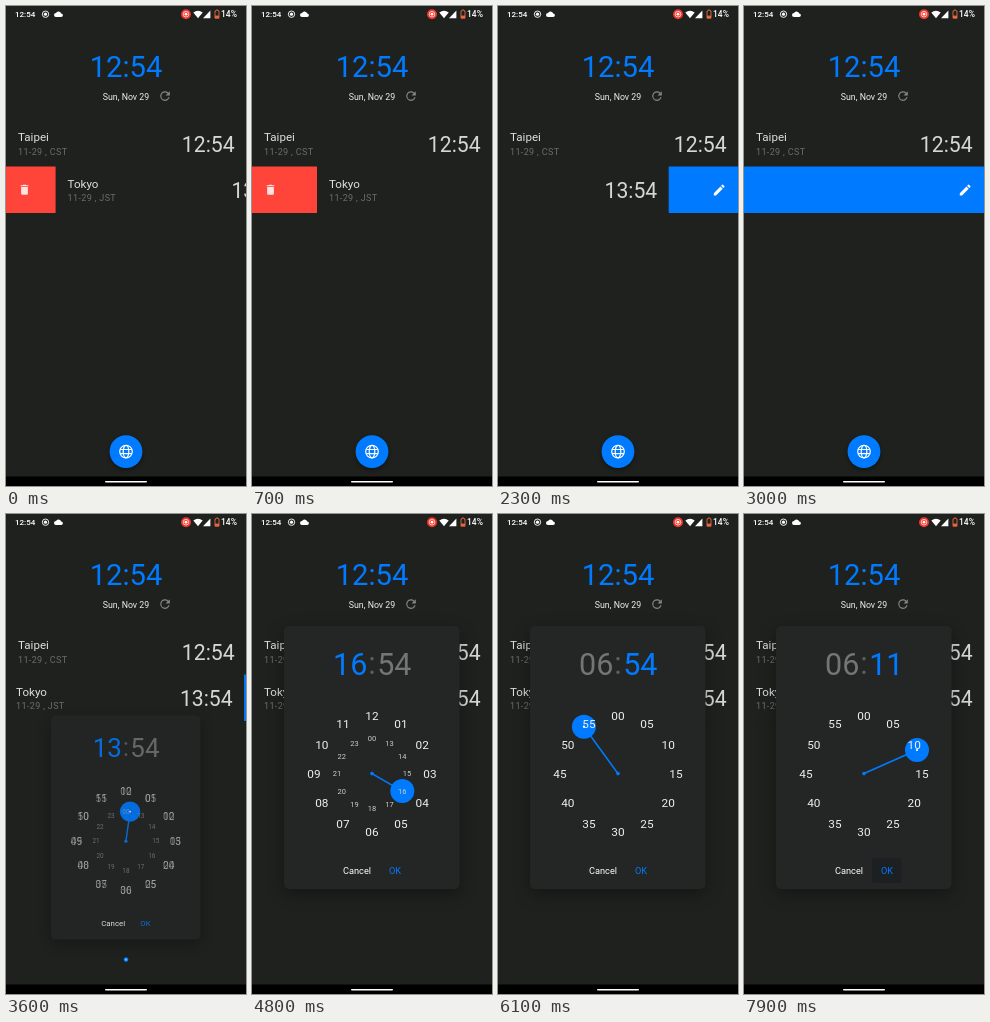
An HTML page for the animation above (8 s loop, 240x480 px).

```html
<!DOCTYPE html>
<html lang="en">
<head>
<meta charset="utf-8">
<title>World clock</title>
<style>
  html, body { margin: 0; height: 100%; overflow: hidden; background: #1f211f; }
  svg { display: block; width: 100vw; height: 100vh; font-family: Roboto, sans-serif; }
  .mid { text-anchor: middle; }
  .end { text-anchor: end; }
  .city { font-size: 11.6px; fill: #dedede; }
  .zone { font-size: 9px; letter-spacing: .35px; fill: #6c6d6c; }
  .time { font-size: 21.2px; fill: #d6d6d6; text-anchor: end; }
  .title { font-size: 30.5px; }
  .button { font-size: 9.2px; text-anchor: middle; }
  .outer { font-size: 11.8px; fill: #eee; text-anchor: middle; }
  .inner { font-size: 7.5px; fill: #ccc; text-anchor: middle; }
  .panel { filter: drop-shadow(0 5px 8px rgba(0, 0, 0, .35)); }
  .raised { filter: drop-shadow(0 2px 2px rgba(0, 0, 0, .4)); }
</style>
</head>
<body>
<svg viewBox="0 0 240 480">
  <rect width="240" height="480" fill="#1f211f"/>

  <!-- status bar -->
  <g fill="#fff" font-size="8" font-weight="500">
    <text x="9" y="11.2">12:54</text>
    <circle cx="39.5" cy="8.2" r="3.2" fill="none" stroke="#fff" stroke-width=".9"/>
    <circle cx="39.5" cy="8.2" r="1.6"/>
    <path d="M50 11a2 2 0 0 1 0-4a2.8 2.8 0 0 1 5.2.6a1.7 1.7 0 0 1 0 3.4z"/>
    <circle cx="180" cy="8.2" r="5" fill="#f0362c"/>
    <circle cx="180" cy="8.2" r="2.8" fill="none" stroke="#fff" stroke-width=".7"/>
    <circle cx="180" cy="8.2" r="1.4"/>
    <path d="M187.3 6.5q4.7-3.6 9.4 0L192 12.2z"/>
    <path d="M197 12.2h7.4V4.6z"/>
    <path d="M209 5h1v-1h2v1h1v7.2h-4z" fill="none" stroke="#e8663f" stroke-width=".9"/>
    <path d="M209 9.6h4v2.6h-4z" fill="#e8663f"/>
    <text x="215" y="11.2" font-size="8.5">14%</text>
  </g>

  <!-- local time -->
  <text class="mid" x="120" y="70.5" font-size="29.2" fill="#007bff">12:54</text>
  <text class="mid" x="120" y="93.6" font-size="8.8" fill="#eee">Sun, Nov 29</text>
  <path fill="#858685" transform="translate(151.8 82.9) scale(.6)" d="M17.65 6.35A8 8 0 1 0 19.73 14h-2.08A6 6 0 1 1 12 6c1.66 0 3.14.69 4.22 1.78L13 11h7V4z"/>

  <!-- cities -->
  <text class="city" x="12" y="135.4">Taipei</text>
  <text class="zone" x="12" y="148.6">11-29 , CST</text>
  <text class="time" x="228.6" y="145.7">12:54</text>
  <g id="remove">
    <rect y="160.5" width="240" height="46.5" fill="#ff443a"/>
    <path fill="#fff" opacity=".85" transform="translate(11.8 177) scale(.56)" d="M6 19a2 2 0 0 0 2 2h8a2 2 0 0 0 2-2V7H6zM19 4h-3.5l-1-1h-5l-1 1H5v2h14z"/>
  </g>
  <g id="edit">
    <rect y="160.5" width="240" height="46.5" fill="#007bff"/>
    <path fill="#fff" transform="translate(214 176.8) scale(.6)" d="M3 17.25V21h3.75L17.81 9.94l-3.75-3.75zM20.71 7.04a1 1 0 0 0 0-1.41l-2.34-2.34a1 1 0 0 0-1.41 0l-1.83 1.83 3.75 3.75z"/>
  </g>
  <g id="row">
    <rect y="160" width="240" height="47.5" fill="#1f211f"/>
    <text class="city" x="12" y="182.2">Tokyo</text>
    <text class="zone" x="12" y="195.3">11-29 , JST</text>
    <text class="time" x="228.6" y="192.4">13:54</text>
  </g>

  <!-- add button -->
  <g id="fab">
    <circle class="raised" r="16.4" fill="#007bff"/>
    <g fill="none" stroke="#fff" stroke-width="1.2">
      <circle r="6.3"/><ellipse rx="2.8" ry="6.3"/><path d="M-5.8-2.1H5.8M-5.8 2.1H5.8"/>
    </g>
  </g>

  <!-- time picker, drawn around its own centre -->
  <g id="dialog"><g transform="translate(-119.5 -243.5)">
    <rect class="panel" x="32" y="112" width="175.5" height="263" rx="5" fill="#242626"/>
    <text class="title end" id="hour" x="115.3" y="161"></text>
    <text class="title mid" x="120" y="160" fill="#5c5d5d">:</text>
    <text class="title" id="minute" x="125.2" y="161"></text>
    <g fill="#007bff" stroke="#007bff">
      <circle cx="120" cy="259.6" r="1.8" stroke="none"/>
      <line id="hand" x1="120" y1="259.6" stroke-width="1.6"/>
      <circle id="knob" r="12" stroke="none"/>
    </g>
    <g id="hours"></g>
    <g id="minutes"></g>
    <circle id="dot" r="1.1" fill="#fff"/>
    <rect id="press" x="128" y="344" width="29.5" height="25" rx="2" fill="#1c2023"/>
    <text class="button" x="105" y="359.8" fill="#fff">Cancel</text>
    <text class="button" x="143" y="359.8" fill="#007bff">OK</text>
  </g></g>

  <!-- navigation bar -->
  <rect y="470.5" width="240" height="9.5"/>
  <rect x="99" y="475" width="42" height="1.4" rx=".7" fill="#fff"/>
</svg>
<script>
const LOOP = 8000, STEP = 100;
const OUTER = 58, INNER = 35;
const BLUE = '#007bff', GREY = '#747575';
const $ = id => document.getElementById(id);
const pad = n => String(n).padStart(2, '0');
const clamp = v => Math.min(1, Math.max(0, v));
const progress = (t, from, to) => clamp((t - from) / (to - from));
const easeOut = u => 1 - (1 - u) ** 3;
const set = (id, attrs) => {
  for (const key in attrs) $(id).setAttribute(key, attrs[key]);
};

// Linear interpolation through [time, value] points.
function track(points, t) {
  const i = points.findIndex(p => p[0] > t);
  if (i < 0) return points[points.length - 1][1];
  if (i === 0) return points[0][1];
  const [t0, v0] = points[i - 1], [t1, v1] = points[i];
  return v0 + (v1 - v0) * (t - t0) / (t1 - t0);
}
// Latest value whose time has been reached.
const stepAt = (points, t) => points.reduce((v, p) => t >= p[0] ? p[1] : v, points[0][1]);

function polar(degrees, radius) {
  const a = degrees * Math.PI / 180;
  return [120 + radius * Math.sin(a), 259.6 - radius * Math.cos(a)];
}

function ring(id, kind, radius, drop, label) {
  for (let i = 0; i < 12; i++) {
    const text = document.createElementNS('http://www.w3.org/2000/svg', 'text');
    const [x, y] = polar(i * 30, radius);
    text.setAttribute('class', kind);
    text.setAttribute('x', x);
    text.setAttribute('y', y + drop);
    text.textContent = pad(label(i));
    $(id).append(text);
  }
}
ring('hours', 'outer', OUTER, 4.2, i => i || 12);
ring('hours', 'inner', INNER, 2.7, i => i && i + 12);
ring('minutes', 'outer', OUTER, 4.2, i => i * 5);

const swipe = [[0, 49.6], [400, 72], [700, 65], [1000, 38], [1400, -8], [1700, -52], [1800, -58],
  [2200, -58], [2500, -92], [2800, -180], [3000, -240]];
const hourSteps = [[0, 13], [4500, 14], [4600, 15], [4800, 16], [4900, 17], [5100, 18], [5300, 6]];
const minuteDrag = [[6400, 54], [6700, 60], [7100, 71]];
const openingHand = [[3300, -36], [3600, 8], [4200, 30]];
const MINUTE_MODE = 5600;

function drawRow(t) {
  const x = t < 3200 ? track(swipe, t) : -240 * (1 - easeOut(progress(t, 3200, 3700)));
  set('row', { transform: `translate(${x} 0)` });
  set('remove', { opacity: x > 0 ? 1 : 0 });
  set('edit', { opacity: x < 0 ? 1 : 0 });
  set('fab', { transform: `translate(120 445.6) scale(${1 - progress(t, 3300, 3650)})` });
}

function drawDialog(t) {
  const open = easeOut(progress(t, 3400, 4000));
  set('dialog', {
    transform: `translate(119.5 ${243.5 + 236 * (1 - open)}) scale(${.5 + .5 * open})`,
    opacity: clamp(open * 1.2)
  });

  const hour = stepAt(hourSteps, t);
  const minute = Math.round(track(minuteDrag, t));
  const minuteMode = t >= MINUTE_MODE;
  $('hour').textContent = pad(hour);
  $('minute').textContent = pad(minute % 60);
  set('hour', { fill: minuteMode ? GREY : BLUE });
  set('minute', { fill: minuteMode ? BLUE : GREY });

  const hoursShown = minuteMode ? 1 - progress(t, MINUTE_MODE, 6000) : progress(t, 3300, 3900);
  set('hours', { opacity: hoursShown });
  set('minutes', { opacity: 1 - hoursShown });

  let angle = hour * 30;
  const radius = hour > 12 ? INNER : OUTER;
  if (t < 4500) angle = track(openingHand, t);
  if (minuteMode) {
    const sweep = easeOut(progress(t, 5500, 6100));
    angle = 180 + (minute * 6 - 180) * sweep;
  }
  const [x, y] = polar(angle, radius);
  set('hand', { x2: x, y2: y });
  set('knob', { cx: x, cy: y });
  set('dot', { cx: x, cy: y, opacity: Math.abs(angle % 30) > .01 ? 1 : 0 });
  set('press', { opacity: progress(t, 7700, 7900) });
}

function frame() {
  const t = Math.floor(performance.now() % LOOP / STEP) * STEP;
  drawRow(t);
  drawDialog(t);
  requestAnimationFrame(frame);
}
frame();
</script>
</body>
</html>
```
